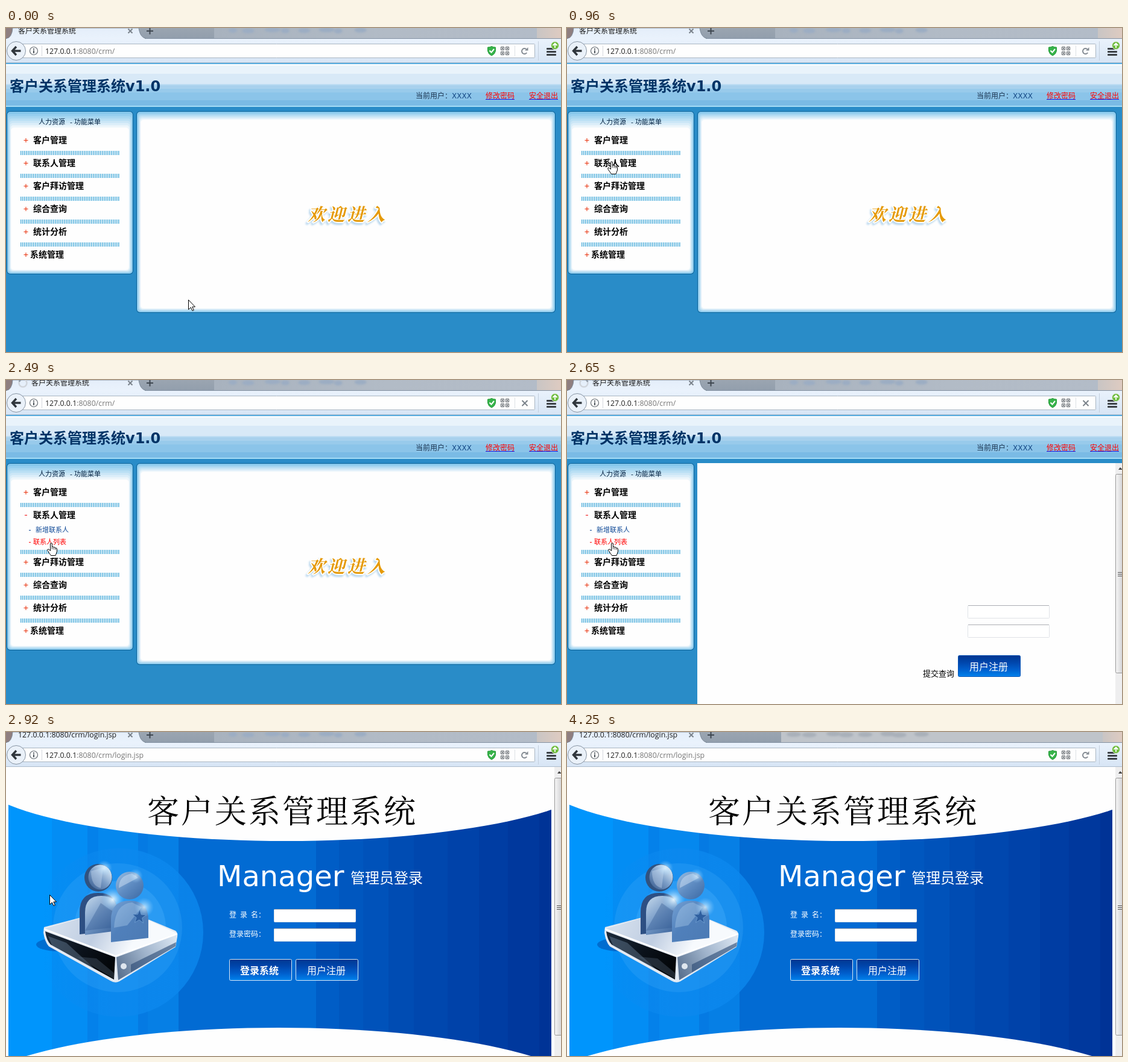
An HTML page with a canvas for the animation above (4.35 s loop, 920 px wide and 538 px high).

```html
<!DOCTYPE html>
<html lang="zh-CN">
<head>
<meta charset="utf-8">
<title>客户关系管理系统</title>
<style>
html, body { margin: 0; width: 100%; height: 100%; overflow: hidden; background: #298cc8; }
canvas { display: block; }
</style>
</head>
<body>
<canvas id="stage" width="920" height="538"></canvas>
<script>
const ctx = document.getElementById('stage').getContext('2d');
const LOOP = 4350;
const UI = '"Open Sans", "Noto Sans CJK SC", sans-serif';
const PAGE = '"DejaVu Sans", "Noto Sans CJK SC", sans-serif';
const BRUSH = '"Noto Serif CJK SC", "Noto Sans CJK SC", serif';
const URL_SIZE = 12.35;

// start time, shape, left, top
const CURSOR = [
  [0, 'arrow', 302, 451], [150, 'arrow', 250, 414], [270, 'arrow', 194, 372],
  [420, 'arrow', 128, 338], [550, 'hand', 65, 309], [690, 'hand', 57, 269],
  [840, 'hand', 60, 241], [960, 'hand', 67, 221], [1680, 'arrow', 72, 236],
  [1820, 'hand', 67, 250], [1940, 'hand', 68, 270], [2770, 'arrow', 72, 270],
  [3390, 'hand', 431, 408], [3530, 'none', 0, 0]
];
const SHAPES = {
  arrow: new Path2D('M.5.5V16.5L4.3 13 7 18.5 9.3 17.5 6.8 12H11.5Z'),
  hand: new Path2D('M5.5 1.5Q7 0 8.3 1.5V7Q10 6 11.2 7.7 13 7 14 8.9 16.5 8.5 16.5 11V15L14 21.5H6.5L1 13.5Q0 10.5 2.7 11L5.5 13.5Z')
};

function rect(x, y, w, h, fill) {
  ctx.fillStyle = fill;
  ctx.fillRect(x, y, w, h);
}

function paint(fill, stroke, width = 1) {
  if (fill) { ctx.fillStyle = fill; ctx.fill(); }
  if (stroke) { ctx.strokeStyle = stroke; ctx.lineWidth = width; ctx.stroke(); }
}

function round(x, y, w, h, r, fill, stroke) {
  ctx.beginPath();
  ctx.roundRect(x, y, w, h, r);
  paint(fill, stroke);
}

function ellipse(x, y, rx, ry, fill, stroke, width) {
  ctx.beginPath();
  ctx.ellipse(x, y, rx, ry, 0, 0, Math.PI * 2);
  paint(fill, stroke, width);
}

function shape(d, fill, stroke, width = 1) {
  const path = new Path2D(d);
  if (fill) { ctx.fillStyle = fill; ctx.fill(path); }
  if (stroke) { ctx.strokeStyle = stroke; ctx.lineWidth = width; ctx.stroke(path); }
}

function gradient(x0, y0, x1, y1, ...colors) {
  const g = ctx.createLinearGradient(x0, y0, x1, y1);
  colors.forEach((c, i) => g.addColorStop(i / (colors.length - 1), c));
  return g;
}

function glow(x, y, r, color) {
  const g = ctx.createRadialGradient(x, y, 0, x, y, r);
  g.addColorStop(0, color);
  g.addColorStop(1, 'rgba(150,210,255,0)');
  ellipse(x, y, r, r, g);
}

function text(str, x, y, size, fill, style = '', family = PAGE) {
  ctx.font = `${style} ${size}px ${family}`;
  ctx.fillStyle = fill;
  ctx.fillText(str, x, y);
}

function clipped(x, y, w, h, draw) {
  ctx.save();
  ctx.beginPath();
  ctx.rect(x, y, w, h);
  ctx.clip();
  draw();
  ctx.restore();
}

function tabStrip(late) {
  rect(0, 0, 920, 18, gradient(0, 0, 0, 18, '#9ba5b1', '#929eac'));
  const left = late ? 355 : 345, edge = late ? 888 : 880;
  rect(left, 0, 920 - left, 18, late ? '#bfc4ca' : gradient(345, 0, 920, 0, '#a8b2be', '#b2bbc6', '#b3bcc8'));
  clipped(left, 0, 920 - left, 18, () => {
    ctx.filter = 'blur(1.5px)';
    for (let i = 0; i < 8; i++) {
      const x = 376 + i * 30 + 6 * Math.sin(i * 4);
      ellipse(x, 4 + Math.sin(i * 2.3), late ? 12 : 7 + i % 3 * 3, 4, late ? '#a9b0b9' : '#9cadc3');
    }
    ctx.filter = 'none';
    rect(edge, 0, 920 - edge, 18, gradient(edge, 0, 920, 0, '#c9c5c4', '#decbc1'));
  });
  rect(0, 0, 14, 18, '#8f7f80');
  shape('M0 18Q10 16 11 0H220C222 12 226 18 237 18Z', gradient(0, 0, 0, 18, '#e4eefa', '#eaf2fc'), '#7d8a99');
  rect(0, 17, 920, 1, '#8492a3');
  rect(2, 17, 228, 2, '#eaf2fc');
}

function tabTitle(t) {
  const loading = t >= 2490 && t < 2920;
  const [title, size] = t < 2770 ? ['客户关系管理系统', 12] : ['127.0.0.1:8080/crm/login.jsp', URL_SIZE];
  if (loading) {
    const blue = t >= 2770;
    ellipse(28, 5, 6.5, 6.5, null, blue ? '#b9dcf5' : '#d0d5dc', 2.5);
    ctx.beginPath();
    const start = blue ? 0 : t < 2650 ? 3.5 : 4.2;
    ctx.arc(28, 5, 6.5, start, start + (blue ? 4 : 1.8));
    paint(null, blue ? '#2295e6' : '#8e99a6', 2.5);
  }
  clipped(18, 0, 179, 18, () => text(title, loading ? 42 : 20, 9, size, '#1b1b1b', '', UI));
  if (loading && t >= 2770) rect(180, 0, 17, 14, gradient(180, 0, 197, 0, '#e7f0fb00', '#e7f0fb'));
  shape('M202.500 1.500L209.500 8.500M209.500 1.500L202.500 8.500', null, '#7b838c', 2);
  shape('M233 5H244M238.500 0V10.500', null, '#3f4750', 2);
}

function toolbar(t) {
  rect(0, 18, 920, 40, gradient(0, 18, 0, 57, '#eaf2fc', '#d7e5f5'));
  rect(0, 57, 920, 1, '#adbccc');
  round(20.5, 26.5, 856, 23, 1, '#fefefe', '#a9b5c2');
  ellipse(17, 38, 15.5, 15.5, '#eaf1f9', '#8794a3');
  shape('M10.500 38H24.500M17 31L10.500 38 17 45', null, '#30363c', 3.4);
  ellipse(46, 38, 6.5, 6.5, null, '#666d74', 1.2);
  rect(45, 37, 2, 5, '#555c63');
  rect(45, 34, 2, 2, '#555c63');
  rect(59, 29, 1, 18, '#d5d9de');
  text('127.0.0.1', 65, 43, URL_SIZE, '#222', '', UI);
  const width = ctx.measureText('127.0.0.1').width;
  text(':8080/crm/' + (t < 2770 ? '' : 'login.jsp'), 65 + width, 43, URL_SIZE, '#777', '', UI);

  shape('M798.500 32Q802 32 805 30.500 808 32 811.500 32V38Q811 43 805 46 799 43 798.500 38Z', '#37b34a', '#279a3b');
  shape('M801.500 37.500L804.500 40.500 809 35', null, '#fff', 2);
  for (const [x, y] of [[820.5, 31.5], [828.5, 31.5], [820.5, 39.5], [828.5, 39.5]]) {
    round(x, y, 5, 5, 0, null, '#555b61');
    rect(x + 1.5, y + 1.5, 2, 2, '#555b61');
  }
  rect(843, 29, 1, 18, '#dde1e5');
  if (t >= 2490 && t < 2920) {
    shape('M855.500 34L864.500 43M864.500 34L855.500 43', null, '#7a828a', 2);
  } else {
    ctx.beginPath();
    ctx.arc(859.5, 38.5, 4.5, .6, 5.4);
    paint(null, '#858c94', 2);
    shape('M860 37.500H865.500V32Z', '#858c94');
  }
  rect(882, 22, 1, 32, '#c3cfdd');
  for (let i = 0; i < 3; i++) round(896, 33 + i * 5, 16, 3, 1, '#3c4146');
  ellipse(910, 29, 6.5, 6.5, '#6cbb3c', '#e6f0df');
  shape('M910 33V25.500M906.500 29L910 25.500 913.500 29', null, '#fff', 1.8);
}

function panel(x, y, w, h, head) {
  round(x, y, w, h, 6, '#0a6299');
  for (let i = 0; i < 8; i++) {
    const k = i / 7, inset = 1 + i * .9, top = inset + head * k;
    const color = `rgb(${133 + 121 * k}, ${199 + 55 * k}, ${236 + 18 * k})`;
    round(x + inset, y + top, w - 2 * inset, h - top - inset, 5, color);
  }
}

function banner() {
  const bands = [[58, '#59aee1'], [60, '#fdfeff'], [62, '#e9f3fb'], [76, '#d8e9f7'], [93, '#bcdcf2'],
    [95, '#a8d1ed'], [101, '#98caeb'], [107, '#8bc4e9'], [120, '#7abbe5'], [129, '#a5dcf6'], [131, '#298cc8']];
  for (const [y, color] of bands) rect(0, y, 920, 538 - y, color);
  text('客户关系管理系统v1.0', 6, 105, 24, '#003366', 'bold');
  text('当前用户：', 679, 117, 12, '#1c3450');
  text('XXXX', 739, 117, 12, '#174a86');
  for (const [label, x] of [['修改密码', 795], ['安全退出', 867]]) {
    text(label, x, 117, 12, '#f00');
    rect(x, 118, 48, 1, '#1414e0');
  }
}

function menu(t) {
  const open = t >= 1550, shift = open ? 40 : 0;
  panel(1, 138, 210, 271 + shift, 20);
  text('人力资源', 54, 160, 11, '#001f3f', '500');
  text('-', 106, 160, 11, '#001f3f');
  text('功能菜单', 113, 160, 11, '#001f3f', '500');
  ['客户管理', '联系人管理', '客户拜访管理', '综合查询', '统计分析', '系统管理'].forEach((label, i) => {
    const y = 186 + i * 38 + (i > 1 ? shift : 0);
    const x = i === 5 ? 40 : 45;
    if (open && i === 1) rect(31, y, 4, 1, '#e00');
    else shape(`M29.500 ${y + .5}h7m-3.500 -3.500v7`, null, '#e8330f', 1.1);
    text(label, x, y + 5, 14, '#000', 'bold');
    if (i < 5) {
      const lineY = y + 18 + (i === 1 ? shift : 0);
      for (let sx = 24; sx < 189; sx += 3) {
        rect(sx, lineY, 2, 7, '#9ed3ec');
        rect(sx, lineY, 1, 7, '#58b2dc');
      }
    }
  });
  if (!open) return;
  const first = t >= 1820 && t < 1940, second = t >= 1940;
  rect(38, 249, 3, 1, first ? '#f00' : '#0b4695');
  text('新增联系人', 49, 253, 11, first ? '#f00' : '#0b4695');
  rect(38, 269, 3, 1, second ? '#f00' : '#0b4695');
  text('联系人列表', 45, 273, 11, second ? '#f00' : '#0b4695');
}

function welcome() {
  panel(216, 138, 695, 335, 7);
  ctx.save();
  ctx.lineJoin = 'round';
  ctx.font = `italic 900 29px ${BRUSH}`;
  ctx.letterSpacing = '4px';
  ctx.shadowColor = '#b9d7ee';
  ctx.shadowBlur = 3;
  ctx.shadowOffsetX = -2;
  ctx.shadowOffsetY = 3;
  ctx.strokeStyle = '#fff';
  ctx.lineWidth = 4;
  ctx.strokeText('欢迎进入', 500, 320);
  ctx.shadowColor = 'transparent';
  ctx.fillStyle = '#e59a08';
  ctx.fillText('欢迎进入', 500, 320);
  ctx.restore();
}

function scrollbar(top, thumbEnd) {
  const mid = Math.round((top + 19 + thumbEnd) / 2);
  rect(909, top, 11, 538 - top, '#eeeeef');
  shape(`M914 ${top + 11}h6v-1l-3 -3z`, '#444');
  round(909.5, top + 18.5, 16, thumbEnd - top - 19, 2, gradient(910, 0, 920, 0, '#f5f5f5', '#d6d6d8'), '#969696');
  for (let i = -1; i < 2; i++) rect(913, mid + i * 3, 7, 1, '#555');
}

function input(x, y) {
  round(x + .5, y + .5, 135, 21, 1, '#fff', '#dfe2e7');
  rect(x + 1, y, 134, 1, '#abadb3');
}

function button(label, x, y, border, style) {
  round(x + .5, y + .5, 103, 35, 2, gradient(0, y, 0, y + 36, '#00368f', '#0046ac', '#005fcd', '#0084ee'), border);
  text(label, x + (style ? 18 : 19), y + 25, 16, '#fff', style);
}

function torso(x, y, grow, fill) {
  const w = 31 + grow, top = y + 25 - grow;
  shape(`M${x - w} ${y + 94}V${y + 57}Q${x - w} ${top} ${x} ${top}T${x + w} ${y + 57}V${y + 87}Z`, fill);
}

function backPerson(x, y) {
  torso(x, y, 0, '#2d4f83');
  torso(x + 5, y + 1, -4, gradient(x - 20, y + 40, x + 22, y + 90, '#b5cce4', '#7599c6', '#41699f'));
  shape(`M${x - 22} ${y + 88}L${x + 4} ${y + 42} ${x + 30} ${y + 60}V${y + 82}Z`, 'rgba(45,85,140,.35)');
  ellipse(x, y, 23, 23, '#31527f');
  ellipse(x + 3, y - 1, 19.5, 20.5, gradient(x - 12, y + 14, x + 16, y - 16, '#46699a', '#7d9fc8', '#d5e7f6'));
  shape(`M${x - 12} ${y - 11}L${x + 8} ${y - 17} ${x + 4} ${y + 17}Q${x - 12} ${y + 14} ${x - 12} ${y - 11}Z`, 'rgba(215,230,246,.35)');
  glow(x + 10, y - 16, 13, 'rgba(225,245,255,.75)');
  glow(x + 24, y + 36, 19, 'rgba(240,251,255,.95)');
}

function frontPerson(x, y) {
  torso(x, y, 0, gradient(x - 25, y + 30, x + 25, y + 80, '#6f9cd0', '#5080bb', '#4d7cb6'));
  shape(`M${x - 26} ${y + 70}Q${x - 24} ${y + 30} ${x + 4} ${y + 28}L${x + 20} ${y + 36} ${x - 4} ${y + 66}Z`, 'rgba(175,205,235,.38)');
  ellipse(x, y, 23, 23, gradient(x - 14, y - 16, x + 14, y + 16, '#86add7', '#5f8cc2', '#4875ae'));
  shape(`M${x - 18} ${y + 4}Q${x - 18} ${y - 17} ${x + 4} ${y - 20}L${x + 14} ${y - 13}Z`, 'rgba(205,224,243,.5)');
  glow(x + 10, y - 16, 12, 'rgba(225,245,255,.65)');
  glow(x + 24, y + 36, 16, 'rgba(225,245,255,.8)');
  ctx.beginPath();
  for (let i = 0; i < 10; i++) {
    const a = i * Math.PI / 5 - Math.PI / 2 + .05, r = i % 2 ? 5 : 12;
    ctx.lineTo(x + 16 + r * Math.cos(a), y + 52 + r * Math.sin(a));
  }
  ctx.closePath();
  paint('#2f5f9f', '#7ca9d8', .7);
}

function emblem() {
  ellipse(187, 333, 140, 140, gradient(60, 0, 180, 0, 'rgba(12,140,242,0)', 'rgba(12,136,238,.8)'));
  ellipse(185, 325, 107, 107, 'rgba(70,170,245,.25)');
  ellipse(189, 325, 76, 78, 'rgba(100,190,255,.22)');
  ellipse(86, 353, 36, 11, 'rgba(0,70,165,.5)');
  shape('M63 324L128 307Q185 299 238 312L281 330Q285 333 284 340L281 357 188 414Q181 418 173 413L71 356Q64 348 62 333Z', '#e3eaf3');
  shape('M64 327L128 308Q185 301 238 313L283 334 182 371Z', gradient(90, 310, 200, 370, '#d3deec', '#c0cee2', '#f7fafd'));
  shape('M65 331L181 374 179 411 74 353Q67 346 65 331Z', gradient(65, 330, 178, 410, '#1d2c3d', '#0b121b', '#010305'));
  shape('M70 339L100 350 150 396 76 354Z', 'rgba(120,145,172,.38)');
  shape('M118 373L150 376 179 400V410Z', 'rgba(85,102,122,.35)');
  shape('M183 374L283 337 281 356 186 412Z', gradient(185, 400, 281, 345, '#5b7290', '#9fb3cb', '#d9e4f0'));
  shape('M207 386L282 349 281 356 207 399Z', 'rgba(40,72,116,.6)');
  shape('M63 327L182 372 284 335', null, '#fff', 2.4);
  ellipse(195, 389, 5, 5, '#dfe6ee');
  backPerson(153, 242);
  frontPerson(205, 255);
}

// Coordinates are those of the full-window login page.
function login(coarse) {
  const bands = coarse
    ? [[4, '#0890f4'], [286, '#006bd2'], [514, '#005ac3'], [568, '#0051b9']]
    : [[4, '#0095fc'], [76, '#038df4'], [135, '#0588ee'], [219, '#067fe5'], [286, '#026bd3'], [514, '#005dc6'],
       [552, '#0057bf'], [592, '#0052ba'], [634, '#004cb3'], [676, '#0047ae'], [732, '#0042a9'],
       [784, '#003da3'], [832, '#00389d'], [884, '#003396']];
  rect(0, 58, 909, 480, '#fefefe');
  clipped(4, 58, 900, 480, () => {
    for (const [x, color] of bands) rect(x, 58, 904 - x, 480, color);
    if (!coarse) for (const x of [135, 219]) rect(x, 58, x < 200 ? 18 : 16, 480, 'rgba(0,105,220,.22)');
    else rect(219, 160, 16, 38, 'rgba(0,95,205,.3)');
    emblem();
    ellipse(465, 69, 520, 112, '#fefefe');
    ellipse(452, 607, 520, 116, '#fefefe');
  });
  ctx.letterSpacing = '3px';
  text('客户关系管理系统', 234, 151, 53, '#000', '', BRUSH);
  ctx.letterSpacing = '0px';
  text('Manager', 350, 256, 48, '#fff');
  text('管理员登录', 571, 251, 24, '#fff');
  text('登', 370, 308, 12, '#fff');
  text('录', 388, 308, 12, '#fff');
  text('名：', 406, 308, 12, '#fff');
  text('登录密码：', 370, 340, 12, '#fff');
  input(444, 294);
  input(444, 326);
  button('登录系统', 370, 377, '#d9e8f7', 'bold');
  button('用户注册', 480, 377, '#d9e8f7', '');
}

function content(t) {
  if (t >= 2920) {
    login(false);
    scrollbar(58, 504);
    return;
  }
  banner();
  menu(t);
  if (t < 2650) {
    welcome();
    return;
  }
  rect(216, 138, 704, 400, '#fefefe');
  if (t < 2770) {
    input(664, 374);
    input(664, 406);
    text('提交查询', 590, 492, 13, '#000');
    button('用户注册', 648, 457, '#0a54b5', '');
    scrollbar(138, 487);
  } else {
    clipped(216, 138, 693, 400, () => {
      ctx.translate(220, 80);
      login(true);
    });
    scrollbar(138, 423);
  }
}

function pointer(t) {
  const [, kind, x, y] = CURSOR.findLast(step => step[0] <= t);
  if (kind === 'none') return;
  ctx.save();
  ctx.translate(x, y);
  ctx.fillStyle = '#fff';
  ctx.strokeStyle = '#000';
  ctx.lineWidth = 1;
  ctx.fill(SHAPES[kind]);
  ctx.stroke(SHAPES[kind]);
  if (kind === 'hand') shape('M8.300 7V11M11.200 8V11.500M14 9V12', null, '#000', .8);
  ctx.restore();
}

function render(now) {
  const t = now % LOOP;
  content(t);
  tabStrip(t >= 4250);
  toolbar(t);
  tabTitle(t);
  pointer(t);
  requestAnimationFrame(render);
}
requestAnimationFrame(render);
</script>
</body>
</html>
```
